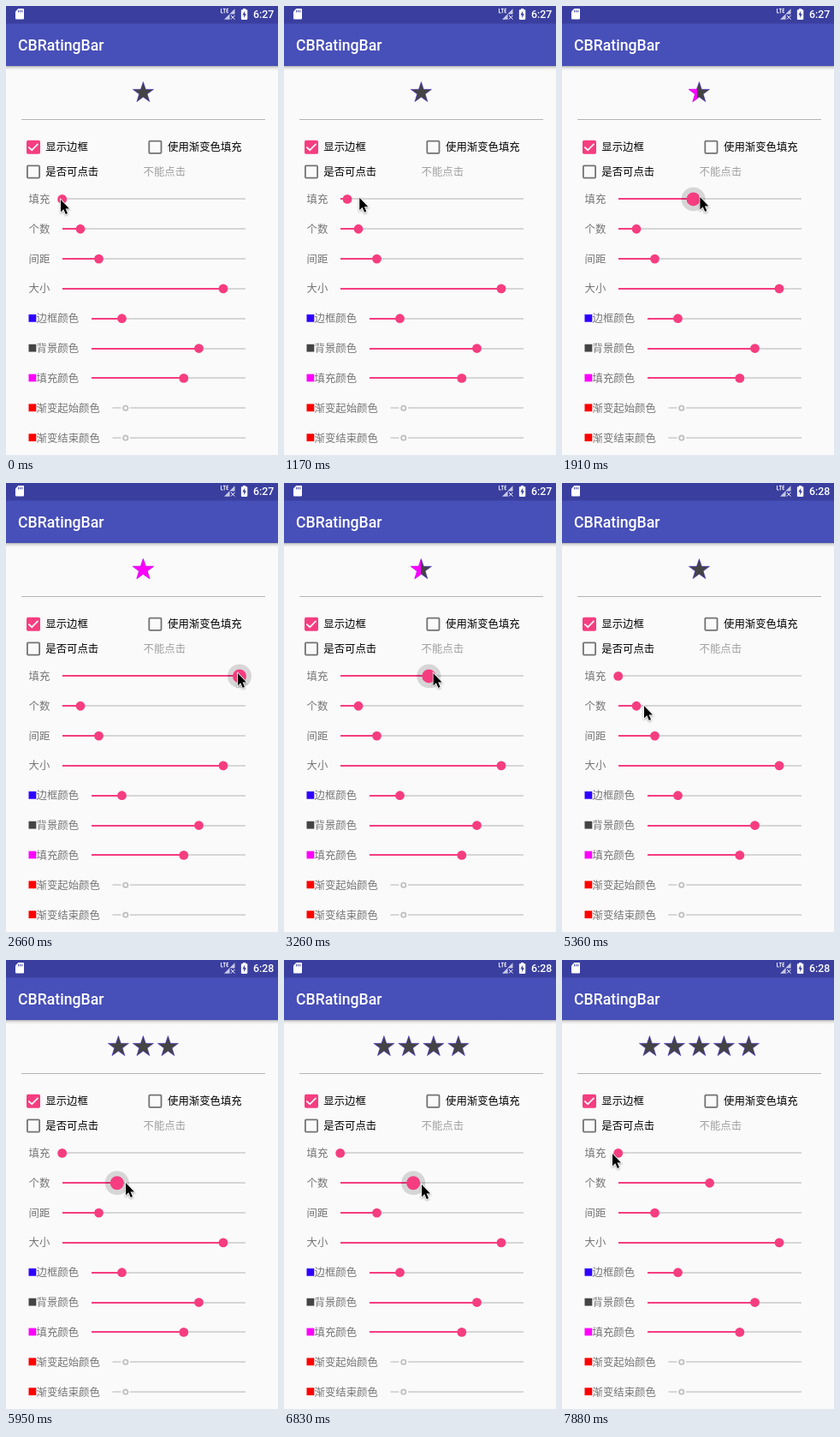
Write an HTML page that moves like this. It is 318 by 524 pixels and loops after 8000 ms.

```html
<!DOCTYPE html>
<html lang="zh-CN">
<head>
<meta charset="utf-8">
<title>CBRatingBar</title>
<style>
html, body { margin: 0; width: 100%; height: 100%; overflow: hidden; background: #fafafa; }
svg { display: block; width: 318px; height: 524px; }
text { font: 12.4px "Noto Sans CJK SC", "Noto Sans CJK", sans-serif; }
.bar { font-family: Roboto, sans-serif; font-weight: 500; fill: #fff; }
.label { fill: #757575; }
.track { fill: #d6d6d6; }
.accent { fill: #f53d80; }
.box { fill: none; stroke: #737373; stroke-width: 1.8; }
.rim { stroke: #3000ff; stroke-width: .9; stroke-opacity: .45; }
#cursor { stroke: #fff; stroke-width: 1.6; paint-order: stroke; filter: drop-shadow(.5px 1px 1px rgba(0, 0, 0, .35)); }
</style>
</head>
<body>
<svg viewBox="0 0 318 524">
  <defs>
    <linearGradient id="shade" x2="0" y2="1">
      <stop offset="0" stop-opacity=".3"/>
      <stop offset=".4" stop-opacity=".1"/>
      <stop offset="1" stop-opacity="0"/>
    </linearGradient>
    <clipPath id="level"><rect id="levelBox" x="147.5" y="86" width="0" height="30"/></clipPath>
    <path id="star"/>
  </defs>
  <rect width="318" height="524" fill="#fafafa"/>
  <rect y="70" width="318" height="5" fill="url(#shade)"/>
  <rect width="318" height="70" fill="#474fb8"/>
  <rect width="318" height="20.5" fill="#3a3f9f"/>

  <g fill="#fff">
    <path d="M14.3 3H20q1 0 1 1v10.5q0 1-1 1h-8q-1 0-1-1V6.5z"/>
    <path d="M14.6 5v2.4M16.7 5v2.4M18.8 5v2.4" stroke="#3a3f9f"/>
    <path d="M251.5 3v5h2.2M253.8 3.4h3M255.3 3.4v5M260 3.4h-2v4.2h2M258 5.5h1.8" fill="none" stroke="#fff" stroke-width=".9"/>
    <path d="M255 15.8L267.5 3.3V9.6H261.6V15.8z" opacity=".72"/>
    <path d="M263 11l4.5 4.5M267.5 11L263 15.5" stroke="#fff"/>
    <path d="M277 3h3.2v1.3h1.3q.8 0 .8.8v10q0 .8-.8.8h-5.8q-.8 0-.8-.8v-10q0-.8.8-.8H277z"/>
    <path d="M279.2 5.8l-2.8 4.8h1.8v3.4l2.7-4.8h-1.7z" fill="#3a3f9f"/>
  </g>
  <text id="clock" class="bar" x="289" y="14.2">6:27</text>
  <text class="bar" x="14" y="51.6" style="font-size:17.67px">CBRatingBar</text>

  <g id="stars" fill="#444"></g>
  <g clip-path="url(#level)">
    <use href="#star" x="160.4" y="101.3" fill="#f0f" stroke="#f0f" stroke-width=".6"/>
  </g>
  <rect x="18" y="132" width="285" height="1" fill="#b4b4b4"/>

  <rect class="accent" x="24" y="156.7" width="16" height="16" rx="1.8"/>
  <path d="M26.4 164.6l3.8 3.6 7.3-7.3" fill="none" stroke="#fafafa" stroke-width="1.7"/>
  <rect class="box" x="24.9" y="186.4" width="14.2" height="14.2" rx="1"/>
  <rect class="box" x="167.3" y="157.6" width="14.2" height="14.2" rx="1"/>
  <text x="46.3" y="169.4">显示边框</text>
  <text x="189" y="169.4">使用渐变色填充</text>
  <text x="46.3" y="198">是否可点击</text>
  <text x="160.5" y="198" fill="#a0a0a0">不能点击</text>

  <g id="rows"></g>
  <path id="cursor" d="M0 0V14.4L3.3 11.3 5.8 17 8 16 5.6 10.5H10z"/>
</svg>
<script>
const $ = id => document.getElementById(id);
const NS = 'http://www.w3.org/2000/svg';
const LOOP = 8000, STEP = 148.85, FIRST = 126;
const END = 280, REST = 65.7;

const set = (el, attrs) => { for (const k in attrs) el.setAttribute(k, attrs[k]); };

function add(parent, tag, attrs, text = '') {
  const el = parent.appendChild(document.createElementNS(NS, tag));
  set(el, attrs);
  el.textContent = text;
  return el;
}

// Five-pointed star
const corner = i => {
  const r = i % 2 ? 5 : 12.8, a = i * Math.PI / 5;
  return `${(r * Math.sin(a)).toFixed(2)} ${(-r * Math.cos(a)).toFixed(2)}`;
};
set($('star'), { d: 'M' + Array.from({ length: 10 }, (_, i) => corner(i)).join('L') + 'z' });

const stars = Array.from({ length: 5 }, () =>
  add($('stars'), 'use', { href: '#star', class: 'rim', y: 101.3 }));

// Label, track start, thumb position, swatch colour
const sliders = [
  ['填充', 66, REST], ['个数', 66, 87], ['间距', 66, 108.5], ['大小', 66, 254],
  ['边框颜色', 100, 135.5, '#3000ff'], ['背景颜色', 100, 225.5, '#444'], ['填充颜色', 100, 207.8, '#f0f'],
  ['渐变起始颜色', 124.5, 0, '#f00'], ['渐变结束颜色', 124.5, 0, '#f00']
].map(([label, from, pos, swatch], i) => {
  const g = add($('rows'), 'g'), y = 225.4 + i * 34.83;
  const line = (cls, x, end) =>
    add(g, 'rect', { class: cls, x, y: Math.round(y) - 1, width: Math.max(0, end - x), height: 2 });
  if (swatch) add(g, 'rect', { x: 26.5, y: y - 4.8, width: 8.8, height: 8.8, fill: swatch });
  add(g, 'text', { class: 'label', x: swatch ? 35.5 : 26.5, y: y + 4.5 }, label);
  if (!pos) {
    line('track', from, 134.5);
    line('track', 145, END);
    add(g, 'circle', { cx: 139.8, cy: y, r: 2.7, fill: 'none', stroke: '#bdbdbd', 'stroke-width': 1.7 });
    return null;
  }
  line('track', from, END);
  const done = line('accent', from, pos);
  const halo = add(g, 'circle', { cx: pos, cy: y, r: 14, opacity: 0 });
  const thumb = add(g, 'circle', { class: 'accent', cx: pos, cy: y, r: 5.4 });
  return (x, held) => {
    set(done, { width: Math.max(0, x - from) });
    set(halo, { cx: x, opacity: held ? .14 : 0 });
    set(thumb, { cx: x, r: held ? 8 : 5.4 });
  };
});

// Moves: first step, last step, new value(s); values hold in between
const pointer = [
  [-1, 2, 101, 223], [2, 5, 70, 224], [6, 17, 271, 222], [18, 25, 46, 222], [29, 32, 85, 260],
  [34, 39, 140, 260], [40, 45, 161, 262], [45, 47, 168, 262], [48, 52, 59, 226]
];
const fill = [[6, 7, 74], [7, 17, 273], [18, 24, REST]];
const amount = [[35, 39, 3], [40, 47, 5]];

function follow(values, moves, step) {
  for (const [a, b, ...to] of moves) {
    const p = Math.min(1, Math.max(0, (step - a) / (b - a)));
    values = values.map((v, i) => v + (to[i] - v) * p);
  }
  return values;
}

// The screen refreshes in even steps
function draw(time) {
  const step = Math.floor((time % LOOP - FIRST) / STEP);
  const [x, y] = follow([64, 226], pointer, step);
  const [level] = follow([REST], fill, step);
  const count = Math.round(follow([1], amount, step)[0]);

  sliders[0](level, step > 7 && step < 30);
  sliders[1](65.6 + 21.4 * count, step > 35 && step < 49);
  stars.forEach((s, i) => set(s, {
    x: 160.4 + (i - (count - 1) / 2) * 29,
    visibility: i < count ? 'visible' : 'hidden'
  }));
  set($('levelBox'), { width: Math.max(0, (level - 66) / 214 * 26) });
  $('clock').textContent = step < 22 ? '6:27' : '6:28';
  set($('cursor'), { transform: `translate(${x} ${y})` });
}

const start = performance.now();
function tick() {
  draw(performance.now() - start);
  requestAnimationFrame(tick);
}
tick();
</script>
</body>
</html>
```
